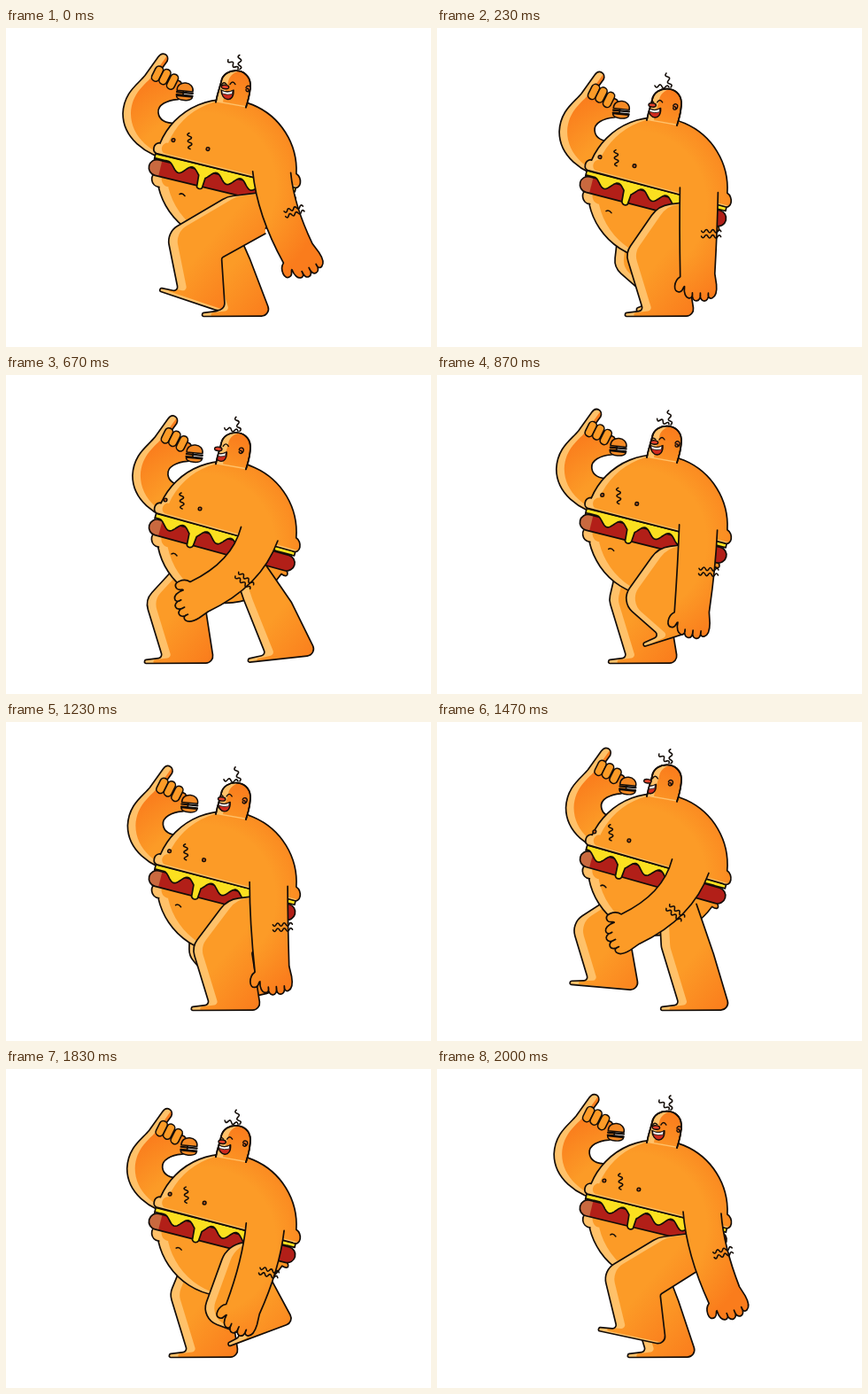
Recreate the animation shown at these times as an HTML page with a canvas. Size 480x360 px, loop 2030 ms.

```html
<!DOCTYPE html>
<html>
<head>
<meta charset="utf-8">
<style>
html, body { margin: 0; width: 100%; height: 100%; overflow: hidden; background: #fff; }
canvas { display: block; }
</style>
</head>
<body>
<canvas id="stage" width="480" height="360"></canvas>
<script>
const ctx = document.getElementById('stage').getContext('2d');
const LOOP = 2030, STEPS = 61, CYCLE = STEPS / 2, TAU = Math.PI * 2;
const LIFT = 17, SWING = 16.5;
const INK = '#140d08', ORANGE = '#fc9b27', DEEP = '#fa7c1c', LIGHT = '#ffc169';

const { sin, cos, hypot, min, max, sqrt } = Math;
const mod = (a, n) => ((a % n) + n) % n;
const mix = (a, b, k) => a + (b - a) * k;
const smoothstep = s => s * s * (3 - 2 * s);
const unit = (x, y) => [x / hypot(x, y), y / hypot(x, y)];

function warm(gradient) {
  gradient.addColorStop(0, ORANGE);
  gradient.addColorStop(.45, ORANGE);
  gradient.addColorStop(1, DEEP);
  return gradient;
}
const skin = warm(ctx.createRadialGradient(222, 178, 40, 222, 178, 135));

function ink(path, width = 1.7) {
  ctx.strokeStyle = INK;
  ctx.lineWidth = width;
  ctx.lineCap = ctx.lineJoin = 'round';
  ctx.stroke(path);
}

// Fills a shape and leaves a light strip along its left side
function shade(path, fill, shift) {
  ctx.fillStyle = fill;
  ctx.fill(path);
  const strip = new Path2D();
  strip.rect(0, -50, 480, 460);
  strip.addPath(path, new DOMMatrix([1, 0, 0, 1, shift, 0]));
  ctx.save();
  ctx.clip(path);
  ctx.fillStyle = LIGHT;
  ctx.fill(strip, 'evenodd');
  ctx.restore();
  ink(path);
}

function paint(d, fill, width) {
  const path = new Path2D(d);
  if (fill) { ctx.fillStyle = fill; ctx.fill(path); }
  ink(path, width);
}

function dot(x, y, rx, ry, fill) {
  const path = new Path2D();
  path.ellipse(x, y, rx, ry, .1, 0, TAU);
  ctx.fillStyle = fill;
  ctx.fill(path);
  ink(path, 1.4);
}

function zigzag(x0, y0, x1, y1, n, amp) {
  const path = new Path2D(), [dx, dy] = unit(x1 - x0, y1 - y0);
  path.moveTo(x0, y0);
  for (let i = 1; i <= n; i++) {
    const a = (i - .5) / n, b = i % 2 ? amp : -amp;
    path.quadraticCurveTo(mix(x0, x1, a) - dy * b, mix(y0, y1, a) + dx * b,
      mix(x0, x1, i / n), mix(y0, y1, i / n));
  }
  ink(path, 1.6);
}

function capsule(x0, y0, x1, y1, w) {
  const path = new Path2D(`M${x0},${y0} L${x1},${y1}`);
  ink(path, w + 3.2);
  ctx.strokeStyle = ORANGE;
  ctx.lineWidth = w;
  ctx.stroke(path);
}

// Steady slide on the ground, then a late, quick swing forward
function step(phase) {
  const p = mod(phase - LIFT, CYCLE), q = min(1, p / SWING);
  const ground = t => 169.5 + 6.2 * t;
  const s = p / 14;
  return {
    x: s < 1 ? mix(ground(LIFT), ground(.5), smoothstep(s ** 1.9)) : ground(p + LIFT - CYCLE),
    y: 325 - 30 * sin(Math.PI * q ** 2.5),
    roll: -sin(TAU * q ** 1.8),
    kick: Math.exp(-(((q - .43) / .15) ** 2))
  };
}

function leg(phase, dy) {
  const { x, y, roll, kick } = step(phase);
  const a = roll * .35;
  const foot = (u, v) => [x + u * cos(a) - v * sin(a), y + u * sin(a) + v * cos(a)];
  const ankle = foot(20, -6), heel = foot(78, 0);
  const tilt = (17 + 48 * kick - 6 * roll) * TAU / 360, shin = 68 - 16 * kick;
  const knee = [ankle[0] - shin * sin(tilt), ankle[1] - shin * cos(tilt)];
  const bend = max(0, 235 - knee[0]) / 2, hip = 190 + dy / 2;
  const back = [(heel[0] + 293) / 2 - bend, (heel[1] + 205) / 2 - 4];
  const end = [293, 205 + bend + dy / 2];
  const corners = [
    [250, hip, 30], [...knee, 20], [...ankle, 4], [...foot(0, -3.5), 1.7],
    [...foot(-1, .5), 1.7], [...heel, 8], [...back, 3], end
  ];
  const path = new Path2D();
  path.moveTo(290, hip - 5);
  corners.slice(0, -1).forEach(([u, v, r], i) =>
    path.arcTo(u, v, corners[i + 1][0], corners[i + 1][1], r));
  path.lineTo(...end);
  shade(path, warm(ctx.createLinearGradient(x, 220, x + 95, 300)), 10);
}

function nearArm(phase) {
  const u = cos((phase - 1.5) / CYCLE * TAU);
  const angle = (-15 + 32 * u) * TAU / 360, bend = 8 - 20 * u;
  const dm = [sin(angle), cos(angle)];
  const side = (x, y, d, k) => [x + d[1] * k, y - d[0] * k];
  const sx = 293 + 8 * u, sy = 152, wx = sx + 104 * dm[0], wy = sy + 104 * dm[1];
  const [cx, cy] = side((sx + wx) / 2, (sy + wy) / 2, dm, bend);
  const d0 = unit(cx - sx, cy - sy), d1 = unit(wx - cx, wy - cy);
  const hand = (e, s) => side(wx + d1[0] * e, wy + d1[1] * e, d1, s);
  const path = new Path2D();
  const bump = (...pts) => path.bezierCurveTo(...pts.flatMap(([e, s]) => hand(e, s)));
  path.moveTo(...side(sx, sy + 8, d0, -22));
  path.quadraticCurveTo(...side(cx, cy, dm, -21), ...hand(4, -19));
  bump([8, -26], [23, -28], [21, -19]);
  bump([20, -15], [15, -16], [15, -14]);
  for (let i = 0; i < 4; i++) {
    const s = -14 + i * 9, tip = i % 3 ? 34 : 31;
    bump([tip, s - 2], [tip, s + 11], [i < 3 ? 22 : 12, s + 9]);
  }
  path.lineTo(...hand(0, 20));
  path.quadraticCurveTo(...side(cx, cy, dm, 22), ...side(sx, sy + 12, d0, 21));
  ctx.fillStyle = skin;
  ctx.fill(path);
  ink(path);
  // Hairs near the elbow
  const mx = (sx + 2 * cx + wx) / 4, my = (sy + 2 * cy + wy) / 4;
  for (const k of [4, 10]) {
    const x = mx + dm[0] * k, y = my + dm[1] * k;
    zigzag(...side(x, y, dm, 4), ...side(x, y, dm, 26), 6, 3.4);
  }
}

function slider() {
  ctx.save();
  ctx.translate(202, 71.5);
  ctx.rotate(.1);
  paint('M-9,-1 C-10,-13 10,-13 9,-1 Z', '#f58a25', 1.5);
  paint('M-9,5 H9 C9,11 -9,11 -9,5 Z', '#f58a25', 1.5);
  paint('M-9,1 H9 M-9,4 H9', null, 2.2);
  ctx.restore();
}

function farArm() {
  const path = new Path2D('M190,150 C155,143 132,122 132,96 C133,72 149,63 157,53 L172,32' +
    ' C177,25 185,30 182,37 L174,48 L197,60 C202,67 202,79 194,80 C182,81 171,86 172,95' +
    ' C173,104 180,107 192,107');
  shade(path, skin, 9);
  slider();
  for (let i = 0; i < 3; i++) {
    const x = 173 + i * 8.5, y = 47 + i * i + i * 2.5;
    capsule(x, y, x - 4, y + 8, 7.5);
  }
}

function cheese(turn) {
  const path = new Path2D('M1,0 V6');
  for (let x = 2; x <= 164; x++) {
    const d = x - turn, drip = d - 58, wavy = d > 17 && d < 129;
    const wave = wavy ? 10 - 5 * cos((d - 17) / 28 * TAU) : 5;
    path.lineTo(x, Math.abs(drip) < 4 ? 23 + sqrt(16 - drip * drip) : wave);
  }
  path.lineTo(164, 0);
  path.closePath();
  ctx.fillStyle = '#fbe01f';
  ctx.fill(path);
  ink(path);
}

function filling(turn) {
  ctx.save();
  ctx.translate(168, 141);
  ctx.rotate(.236);
  const patty = new Path2D();
  patty.roundRect(-3, 6, 170, 18, 9);
  ctx.save();
  ctx.clip(patty);
  ctx.fillStyle = '#b21f18';
  ctx.fillRect(-4, 4, 180, 22);
  ctx.fillStyle = '#c9693f';
  ctx.fillRect(-4, 4, 14, 22);
  ctx.restore();
  ink(patty);
  cheese(turn);
  ctx.restore();
}

function body(turn) {
  ctx.save();
  ctx.translate(248, 160);
  ctx.rotate(-turn * .0028);
  ctx.translate(-248, -160);
  const low = new Path2D('M170,163 C162,164 163,178 173,179');
  low.ellipse(248, 160, 78, 80, 0, 2.9, .6, true);
  low.bezierCurveTo(323, 212, 320, 198, 313, 199);
  low.closePath();
  shade(low, skin, 11);
  filling(turn);
  const top = new Path2D('M170,141 C165,139 166,130 173,129');
  top.arc(248, 160, 80, -2.75, .05);
  top.bezierCurveTo(335, 168, 334, 183, 324, 179);
  top.closePath();
  shade(top, skin, 9);
  ctx.restore();

  ctx.save();
  ctx.translate(turn * .82, turn * .22);
  dot(189, 126, 1.9, 1.9, '#b5541a');
  dot(228, 136, 1.9, 1.9, '#b5541a');
  zigzag(207, 118, 208, 136, 5, 4.5);
  paint('M196,187 q3,-2 6,2', null, 1.5);
  ctx.restore();
}

function head(turn, droop) {
  const path = new Path2D('M237,83 C239,72 242,65 243,60 C246,43 275,43 276,63 C276,75 273,82 271,89');
  const x = turn * .71;
  zigzag(262, 46, 251 - 5 * droop, 35 + 9 * droop, 4, 3.6);
  zigzag(264, 46, 264 - 5 * droop, 30, 4, 3.6);
  shade(path, skin, 8);
  ctx.save();
  ctx.clip(path);
  ctx.translate(x, -.5);
  paint('M243,64.5 q3,-5 6,-1 M253,63.5 q3,-5 6,0', null, 1.4);
  paint('M243,70 Q250,74 257,70 C258,85 243,83 243,70 Z', '#cf2a1e', 1.4);
  paint('M244,70.5 Q250,74 256,70.5 L255.5,74.5 Q250,76 244.5,74 Z', '#fff', .8);
  ctx.restore();
  ink(path);
  dot(247.5 + x, 66, 4.2, 2.2, '#e5432b');
  paint(`M${271 + x},67 c1,-4 6,-2 5,1 c-1,4 -5,4 -5,1 m1,-1 q2,-1 2,2`, '#e9742a', 1.4);
}

function draw(frame) {
  const dy = 10.5 * (1 - cos((frame + .8) / (CYCLE / 2) * TAU));
  const turn = 7 * cos(frame / CYCLE * TAU) - 7;
  const at = (x, y, part) => {
    ctx.save();
    ctx.translate(x, y);
    part();
    ctx.restore();
  };
  ctx.fillStyle = '#fff';
  ctx.fillRect(0, 0, 480, 360);
  at(-turn, dy, farArm);
  at(-42, 0, () => leg(frame + CYCLE / 2, dy));
  at(0, dy, () => body(turn));
  leg(frame, dy);
  at(0, dy, () => {
    nearArm(frame);
    head(turn, dy / 21);
  });
}

function tick() {
  const t = performance.now() % LOOP;
  draw(Math.floor(t / LOOP * STEPS + .15) % STEPS);
  requestAnimationFrame(tick);
}
tick();
</script>
</body>
</html>
```
